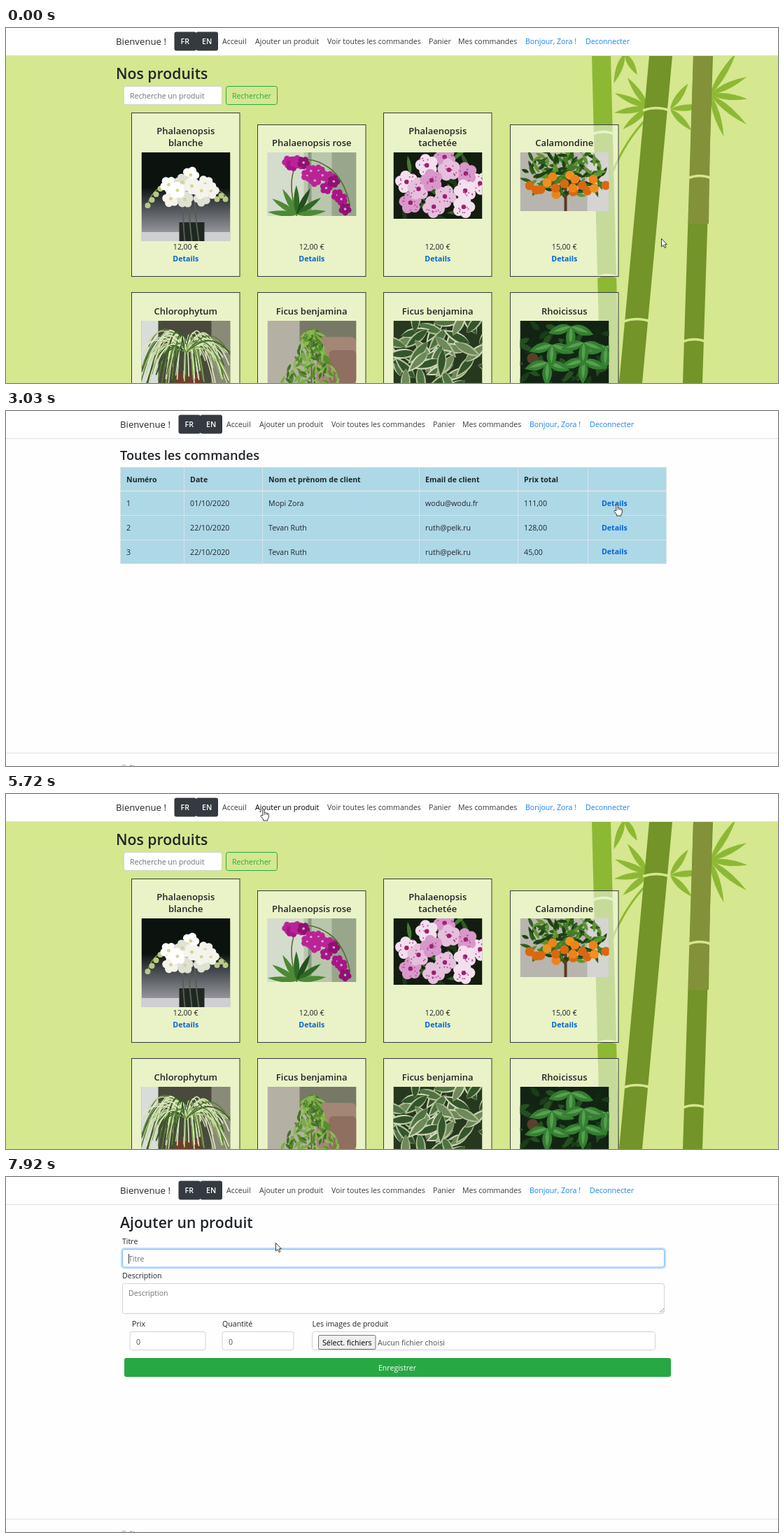
An HTML page that plays this animation: 1103x508 px, repeating every 8 s.

```html
<!DOCTYPE html>
<html lang="fr">
<head>
<meta charset="utf-8">
<title>Boutique de plantes</title>
<style>
  html, body { margin: 0; width: 100%; height: 100%; overflow: hidden; background: #fefefe; }
  svg { display: block; }
  text { font-family: "Open Sans", "Noto Sans", sans-serif; white-space: pre; }
  .page { display: none; }
  .page.on { display: inline; }
  .link { fill: #343a40; }
  .link.hover { fill: #000; }
</style>
</head>
<body>
<svg id="stage" width="1103" height="508" viewBox="0 0 1103 508"></svg>
<script>
const LOOP = 8000;
const INK = '#212529', BLUE = '#add8e6', LINE = '#dee2e6', GRASS = '#d5e78f', FRESH = '#8db834';

let seed = 7;
const rnd = () => (seed = seed * 16807 % 2147483647) / 2147483647;
const between = (a, b) => a + (b - a) * rnd();
const pick = list => list[Math.floor(rnd() * list.length)];
const repeat = (n, fn) => Array.from({ length: n }, (_, i) => fn(i)).join('');

// --- drawing helpers; text is placed by the middle of its capitals ---
const text = (x, y, str, { size = 10.6, weight = 400, fill = INK, anchor = 'start', more = '' } = {}) =>
  `<text x="${x}" y="${y + size * .36}" font-size="${size}" font-weight="${weight}" text-anchor="${anchor}" ${more || `fill="${fill}"`}>${str}</text>`;
const bold = (x, y, str, opt) => text(x, y, str, { weight: 700, ...opt });
const title = (y, str, size, x = 163) => text(x, y, str, { size, weight: 600 });
const box = (x, y, w, h, fill, stroke = 'none', r = 0, more = '') =>
  `<rect x="${x}" y="${y}" width="${w}" height="${h}" rx="${r}" fill="${fill}" stroke="${stroke}" ${more}/>`;
const path = (d, stroke, w = 1, fill = 'none') =>
  `<path d="${d}" fill="${fill}" stroke="${stroke}" stroke-width="${w}"/>`;
const dot = (x, y, r, fill) => `<circle cx="${x}" cy="${y}" r="${r}" fill="${fill}"/>`;

// --- plants ---
const leaf = (x, y, len, deg, w, fill) =>
  `<path transform="translate(${x} ${y}) rotate(${deg})" d="M0 0Q${len * .4} ${-w} ${len} 0Q${len * .4} ${w} 0 0" fill="${fill}"/>`;
const fan = (x, y, from, to, n, len) => repeat(n, i =>
  leaf(x, y, len * between(.85, 1.15), from + (to - from) * i / (n - 1), 9, FRESH));
// even, slightly loose spread over an ellipse, from the rim inwards
const spread = (n, x, y, rx, ry, fn) => repeat(n, i => {
  const a = i * 2.4, d = Math.sqrt(1 - i / n);
  return fn(x + rx * d * Math.cos(a) + between(-3, 3), y + ry * d * Math.sin(a) + between(-3, 3));
});
const foliage = (n, x, y, rx, ry, len, w, cols) => spread(n, x, y, rx, ry, (px, py) =>
  leaf(px, py, len * between(.6, 1.2), rnd() * 360, w, pick(cols)));
const flower = (x, y, r, petal, core) => {
  const turn = rnd() * 6;
  return repeat(5, i => {
    const a = turn + i * 1.257;
    return dot(x + Math.cos(a) * r * .55, y + Math.sin(a) * r * .55, r * .48, petal);
  }) + dot(x, y, r * .2, core);
};

// pictures, 127 wide: [height, drawing]
const photos = {
  white: [127, () => box(0, 0, 127, 127, 'url(#night)') + box(0, 114, 127, 13, '#cfcfd2') + box(54, 100, 36, 27, '#202622')
    + repeat(3, i => path(`M${62 + i * 10} 127Q${58 + i * 9} 90 ${60 + i * 8} 55`, '#566050', 2))
    + path('M40 45Q15 50 8 78M92 48Q112 52 122 64', '#7f9350', 1.5)
    + repeat(4, i => dot(9 + i * 6, 76 - i * 8, 4, '#b9c983') + dot(102 + i * 6, 62 + i % 2 * 5, 4, '#b9c983'))
    + spread(11, 66, 52, 36, 22, (x, y) => flower(x, y, 12, pick(['#f4f4ec', '#dfe2d2', '#fff']), '#d8d38c'))],
  pink: [91, () => box(0, 0, 127, 91, '#b8c7ac') + box(0, 0, 52, 91, '#d3dccd') + box(58, 0, 5, 91, '#8b9b83') + box(92, 0, 35, 91, '#98a68c')
    + path('M42 91Q28 45 40 20Q55 0 88 22Q110 38 118 76', '#586b30', 1.6)
    + repeat(7, i => leaf(42, 89, 42, 185 + i * 28, 8, pick(['#2f6a25', '#4d8a35', '#234f1d'])))
    + repeat(16, i => flower(30 + i * 5.4, 12 + i * i * .24 + between(-7, 18), 9, pick(['#a81589', '#b82496', '#8f1272']), '#e0a0d0'))],
  spot: [95, () => box(0, 0, 127, 95, '#121d10')
    + foliage(24, 63, 47, 64, 48, 34, 6, ['#2f5b23', '#477a36', '#1d3a17'])
    + spread(13, 68, 46, 58, 42, (x, y) => flower(x, y, 16, pick(['#e6bfdd', '#d898ca', '#f4dfee']), '#a01d70')
      + repeat(9, () => dot(x + between(-11, 11), y + between(-11, 11), 1, '#b04c92')))],
  orange: [84, () => box(0, 0, 127, 84, '#b8b5ae') + box(96, 0, 31, 84, '#d5d4d3')
    + path('M65 84V48M65 65L48 42M65 62L86 40', '#5a3a20', 4)
    + foliage(130, 64, 28, 55, 32, 18, 5, ['#2c601c', '#417c26', '#61942f', '#1d4213'])
    + spread(17, 64, 47, 58, 15, (x, y) => dot(x, y, 6.5, pick(['#ed8419', '#da6810', '#f0901f'])))],
  spider: [90, () => box(0, 0, 127, 90, '#4a493d') + box(0, 0, 24, 90, '#d9ddd9') + box(100, 0, 27, 90, '#8a8a78') + box(47, 76, 38, 14, '#6d3f2a')
    + repeat(120, () => {
      const a = between(-1, 1);
      return path(`M64 46Q${64 + a * 38} ${between(-22, 23)} ${64 + a * 66} ${between(35, 95)}`, pick(['#88ad59', '#c9d9a2', '#557f32', '#e1e9c7', '#375d25']), 1.6);
    })],
  ficus: [90, () => box(0, 0, 127, 90, '#b4b0a3') + box(46, 0, 81, 30, '#777966')
    + box(70, 23, 57, 67, '#a48675', 'none', 8) + box(88, 42, 39, 48, '#8e6f60', 'none', 6) + path('M63 90V12', '#6c5a32', 2)
    + repeat(150, i => {
      const y = 10 + i * .55;
      return leaf(63 + between(-.5, .5) * y, y, between(9, 18), between(20, 160), 4, pick(['#568d2c', '#79ad43', '#3f7324', '#8eb951']));
    })],
  cream: [90, () => box(0, 0, 127, 90, '#26391f') + spread(48, 63, 45, 70, 50, (x, y) => {
    const a = rnd() * 360;
    return leaf(x, y, 42, a, 14, pick(['#d0d7b8', '#b2c095'])) + leaf(x, y, 38, a, 10, pick(['#4f7242', '#6e895a', '#34552b']));
  })],
  dark: [90, () => box(0, 0, 127, 90, '#122313')
    + foliage(65, 63, 45, 65, 46, 26, 8, ['#193d18', '#254f20', '#102910']) + dot(18, 54, 8, '#59402d')
    + spread(6, 72, 38, 50, 34, (x, y) => repeat(3, i =>
      leaf(x, y, 34, 20 + i * 72, 14, '#347f32') + leaf(x, y, 27, 20 + i * 72, 5, '#58a050')))]
};
const symbols = Object.entries(photos).map(([id, [h, draw]]) =>
  `<symbol id="${id}" viewBox="0 0 127 ${h}">${draw()}</symbol>`).join('');
const photo = (id, x, y, w = 35.5) => `<use href="#${id}" x="${x}" y="${y}" width="${w}" height="${w * photos[id][0] / 127}"/>`;

// straight cane from y 40 to 508, cut by joints
const cane = (top, bottom, w, fill, joints) => {
  const at = y => top + (bottom - top) * (y - 40) / 468;
  return path(`M${top} 40h${w}L${bottom + w} 508h${-w}z`, 'none', 0, fill)
    + joints.map(y => path(`M${at(y) - 2} ${y + 2}q${w / 2 + 2} -7 ${w + 6} 0`, GRASS, 3.5)).join('');
};
const bamboo = fan(918, 114, 140, 235, 4, 46) + fan(949, 116, -55, 45, 3, 46) + fan(1006, 95, -58, 72, 5, 62) + fan(884, 36, 60, 110, 2, 40)
  + path('M866 208Q885 160 917 128', FRESH, 3)
  + cane(837, 849, 27, FRESH, [150, 355]) + cane(919, 876, 33, '#729428', [116, 418])
  + cane(982, 967, 28, '#729428', []) + path('M982 40H1008L1004 280H975z', 'none', 0, '#839239')
  + cane(982, 967, 28, 'none', [213, 447]);

// --- shared page furniture ---
const links = [[309, 'Acceuil'], [356, 'Ajouter un produit'], [459, 'Voir toutes les commandes'], [604, 'Panier'], [646, 'Mes commandes'], [742]];
const nav = dx => box(0, 0, 1103, 39, '#fff') + path('M0 39.5H1103', LINE) + `<g transform="translate(${dx} 0)">`
  + text(157, 19.5, 'Bienvenue !', { size: 13.2 })
  + ['FR', 'EN'].map((s, i) => box(240.5 + i * 31, 5.5, 31.5, 27, '#343a40', 'none', 3)
    + text(249.5 + i * 30.5, 19.5, s, { fill: '#fff', weight: 600 })).join('')
  + links.slice(0, -1).map(([x, s]) => text(x, 19.5, s, { more: 'class="link"' })).join('')
  + text(742, 19.5, 'Bonjour, Zora !', { fill: '#1a82f0' }) + text(828, 19.5, 'Deconnecter', { fill: '#1a82f0' }) + '</g>';
const frame = body => box(0, 0, 1103, 508, '#fefefe') + nav(6)
  + path('M0 489.5H1103', LINE) + text(164, 511, '© Shop', { fill: '#6c757d' }) + body;

// cols: left edges then the right one; tops: row tops then the bottom
const table = (cols, tops, rows) => {
  const left = cols[0], right = cols[cols.length - 1], end = tops[tops.length - 1];
  const skip = cols.length - 1 - rows[0].length ? 1 : 0;
  return path(cols.map(x => `M${x} ${tops[0]}V${end}`).join('') + tops.map(y => `M${left} ${y}H${right}`).join(''), LINE)
    + path(`M${left} ${tops[1]}H${right}`, LINE, 2)
    + rows.map((cells, r) => cells.map((s, c) =>
      (r ? text : bold)(cols[c + (rows.indent ? skip : 0)] + 8.6, tops[r] + 17.5, s)).join('')).join('');
};

// --- product list ---
const products = [['Phalaenopsis blanche', 'white', 12], ['Phalaenopsis rose', 'pink', 12], ['Phalaenopsis tachetée', 'spot', 12],
  ['Calamondine', 'orange', 15], ['Chlorophytum', 'spider'], ['Ficus benjamina', 'ficus'], ['Ficus benjamina', 'cream'], ['Rhoicissus', 'dark']];
const card = ([name, img, price], i) => {
  const x = Math.floor(179 + 180.4 * (i % 4)) + .5, mid = x + 77.25, low = i > 3;
  const lines = name.length > 17 ? name.split(' ') : [name];
  const y = low ? 378.5 : 155.5 - 17 * lines.length;
  return box(x, y, 154.5, low ? 235 : 355.5 - y, 'rgba(255,255,255,.5)', '#343a40')
    + lines.map((s, k) => text(mid, (low ? 405.5 : 164.5) - (lines.length - 1 - k) * 17, s, { size: 13, weight: 600, anchor: 'middle' })).join('')
    + photo(img, x + 14, low ? 419 : 178, 127)
    + (low ? '' : text(mid, 313.5, price + ',00 €', { anchor: 'middle' }) + bold(mid, 330.5, 'Details', { fill: '#0366d6', anchor: 'middle' }));
};
const home = box(0, 0, 1103, 508, GRASS) + bamboo + nav(0) + title(65, 'Nos produits', 21.2, 157)
  + box(168.5, 83.5, 140, 26, '#fff', '#ced4da', 3) + text(177, 97.5, 'Recherche un produit', { fill: '#6c757d' })
  + box(314.5, 83.5, 73, 26, 'none', '#28a745', 3) + text(351, 97, 'Rechercher', { fill: '#28a745', anchor: 'middle' })
  + products.map(card).join('');

// --- all orders ---
const orders = frame(title(63.5, 'Toutes les commandes', 18.15) + box(163, 80, 781, 138.5, BLUE)
  + table([163.5, 254.5, 366.5, 590.5, 731.5, 831.5, 943.5], [80.5, 114.5, 149.5, 184.5, 218.5], [
    ['Numéro', 'Date', 'Nom et prènom de client', 'Email de client', 'Prix total'],
    ['1', '01/10/2020', 'Mopi Zora', 'wodu@wodu.fr', '111,00'],
    ['2', '22/10/2020', 'Tevan Ruth', 'ruth@pelk.ru', '128,00'],
    ['3', '22/10/2020', 'Tevan Ruth', 'ruth@pelk.ru', '45,00']])
  + repeat(3, i => bold(851, 132.5 + i * 34.5, 'Details', { fill: '#0366d6' })));

// --- one order ---
const span = s => `<tspan font-weight="400">${s}</tspan>`;
const items = [['Produit', 'Quantité', 'Prix par unité', 'Prix total'], ['Phalaenopsis blanche', '1', '12,00', '12,00'],
  ['Phalaenopsis tachetée', '2', '12,00', '24,00'], ['Calamondine', '5', '15,00', '75,00']];
items.indent = true;
const order = frame(title(63.5, 'Commande numéro 1', 18.15)
  + bold(163, 88.5, '01/10/2020', { more: `font-style="italic" fill="${INK}"` })
  + box(169.5, 102.5, 210, 105, BLUE, '#343a40') + bold(175, 117.5, 'Client :') + path('M175 136.5H374', 'rgba(0,0,0,.1)')
  + bold(175, 157.5, 'Nom et prénom : ' + span('Mopi Zora')) + bold(175, 174.5, 'Email : ' + span('wodu@wodu.fr'))
  + box(169.5, 213.5, 769, 236.5, BLUE, '#343a40')
  + table([181.5, 279.5, 517, 636, 802, 926.5], [225.5, 260.5, 313.5, 358.5, 398.5], items)
  + photo('white', 190, 269) + photo('spot', 190, 322) + photo('orange', 190, 366)
  + bold(176, 425, 'Total : 111,00 €'));

// --- new product form ---
const field = (x, y, w, h, str, dx, sy, fill = '#6c757d') => box(x, y, w, h, '#fff', '#ced4da', 3) + text(x + dx, sy, str, { fill });
const form = frame(title(65.5, 'Ajouter un produit', 21.2)
  + text(166, 92, 'Titre') + box(166.5, 103.5, 774, 25.5, '#fff', '#ced4da', 3)
  + '<g id="focus">' + box(165, 102, 777, 28.5, 'none', '#bfdeff', 4, 'stroke-width="2.2"')
  + box(166.5, 103.5, 774, 25.5, '#fff', '#80bdff', 3) + path('M175.5 110V124', '#333') + '</g>'
  + text(175, 117.5, 'Titre', { fill: '#6c757d' })
  + text(166, 141.5, 'Description') + field(166.5, 152.5, 774, 43, 'Description', 8.5, 166)
  + path('M934 194L940 188M937.5 194L940 191.5', '#777', .8)
  + text(180, 210, 'Prix') + field(177, 221.5, 108, 26, '0', 9, 236, '#495057')
  + text(309, 210, 'Quantité') + field(309, 221.5, 102, 26, '0', 9, 236, '#495057')
  + text(437.5, 210, 'Les images de produit') + field(437.5, 221.5, 490, 26, 'Aucun fichier choisi', 93.5, 237, '#495057')
  + box(446.5, 226.5, 81.5, 20, '#efefef', '#767676', 1.5) + text(487.3, 237, 'Sélect. fichiers', { fill: '#000', anchor: 'middle' })
  + box(169, 259, 781, 27, '#28a745', 'none', 3) + text(559, 273, 'Enregistrer', { fill: '#fff', anchor: 'middle' }));

const cursors = {
  arrow: path('M.5 .5V12L3.2 9.5L5 13.6L6.9 12.8L5.1 8.8H8.4Z', '#222', .9, '#fff'),
  hand: path('M-1.2 10V1.4Q0 -.3 1.2 1.4V6Q2.4 4.7 3.4 6.3Q4.7 5.2 5.5 7Q7.2 6.3 7.3 8.2V12Q7 14 5.8 15V17H-.5V15.2L-4.2 10.4Q-3.6 8.2 -1.2 10Z', '#222', .9, '#fff')
    + path('M1.2 6V9M3.4 6.5V9M5.5 7V9.2', '#222', .7)
};

const pages = { home, orders, order, form };
const stage = document.getElementById('stage');
stage.innerHTML = `<defs><linearGradient id="night" x2="0" y2="1"><stop offset=".4" stop-color="#0c130f"/>
  <stop offset=".6" stop-color="#474b50"/><stop offset=".9" stop-color="#94959b"/></linearGradient>${symbols}</defs>`
  + Object.entries(pages).map(([id, body]) => `<g class="page" id="page-${id}">${body}</g>`).join('')
  + '<g id="cursor">' + Object.entries(cursors).map(([id, body]) => `<g id="cur-${id}">${body}</g>`).join('') + '</g>';

// --- timeline ---
const visits = [[0, 'home'], [1920, 'orders'], [3590, 'order'], [5720, 'home'], [6700, 'form']];
// first step, last step, number of steps, destination
const moves = [[430, 1790, 11, 528, 16], [2220, 3030, 7, 873, 133], [4000, 5570, 13, 341, 16],
  [5720, 5720, 1, 368, 21], [5855, 6150, 3, 414, 15], [7100, 7920, 7, 385, 94]];
const FOCUS = 7750;

const pageAt = t => visits.filter(v => v[0] <= t).pop()[1];
// a hand's reach: quick start, long settling
const ease = p => 1 - (1 - p ** 1.5) ** 3;

function pointer(t) {
  let x = 936, y = 301, moved = 0;
  for (const [start, end, n, tx, ty] of moves) {
    if (t < start) break;
    const gap = n > 1 ? (end - start) / (n - 1) : 1;
    const i = Math.min(n - 1, Math.floor((t - start) / gap + 1e-6));
    const p = ease((i + 1) / n);
    x += (tx - x) * p;
    y += (ty - y) * p;
    moved = start + i * gap;
  }
  return { x, y, moved };
}

function hit(page, x, y) {
  const left = x - (page === 'home' ? 0 : 6);
  const link = y > 5 && y < 34 ? links.findIndex(([at], i) => links[i + 1] && left >= at && left <= links[i + 1][0] - 11) : -1;
  const details = page === 'orders' && x > 850 && x < 888 && y > 126 && y < 140;
  return { link, kind: link >= 0 || details ? 'hand' : 'arrow' };
}

const byId = id => document.getElementById(id);
function draw(t) {
  const page = pageAt(t), { x, y, moved } = pointer(t);
  // a newly loaded page ignores the pointer until it moves
  const seen = pageAt(moved + .01), over = hit(seen, x, y);
  for (const id in pages) byId('page-' + id).classList.toggle('on', id === page);
  byId('page-' + page).querySelectorAll('.link').forEach((el, i) =>
    el.classList.toggle('hover', seen === page && i === over.link));
  for (const id in cursors) byId('cur-' + id).style.display = id === over.kind ? '' : 'none';
  byId('cursor').setAttribute('transform', `translate(${Math.round(x)} ${Math.round(y)})`);
  byId('focus').setAttribute('opacity', Math.max(0, Math.min(1, (t - FOCUS) / 150)));
}

const begin = performance.now();
function tick() {
  draw((performance.now() - begin) % LOOP);
  requestAnimationFrame(tick);
}
tick();
</script>
</body>
</html>
```
